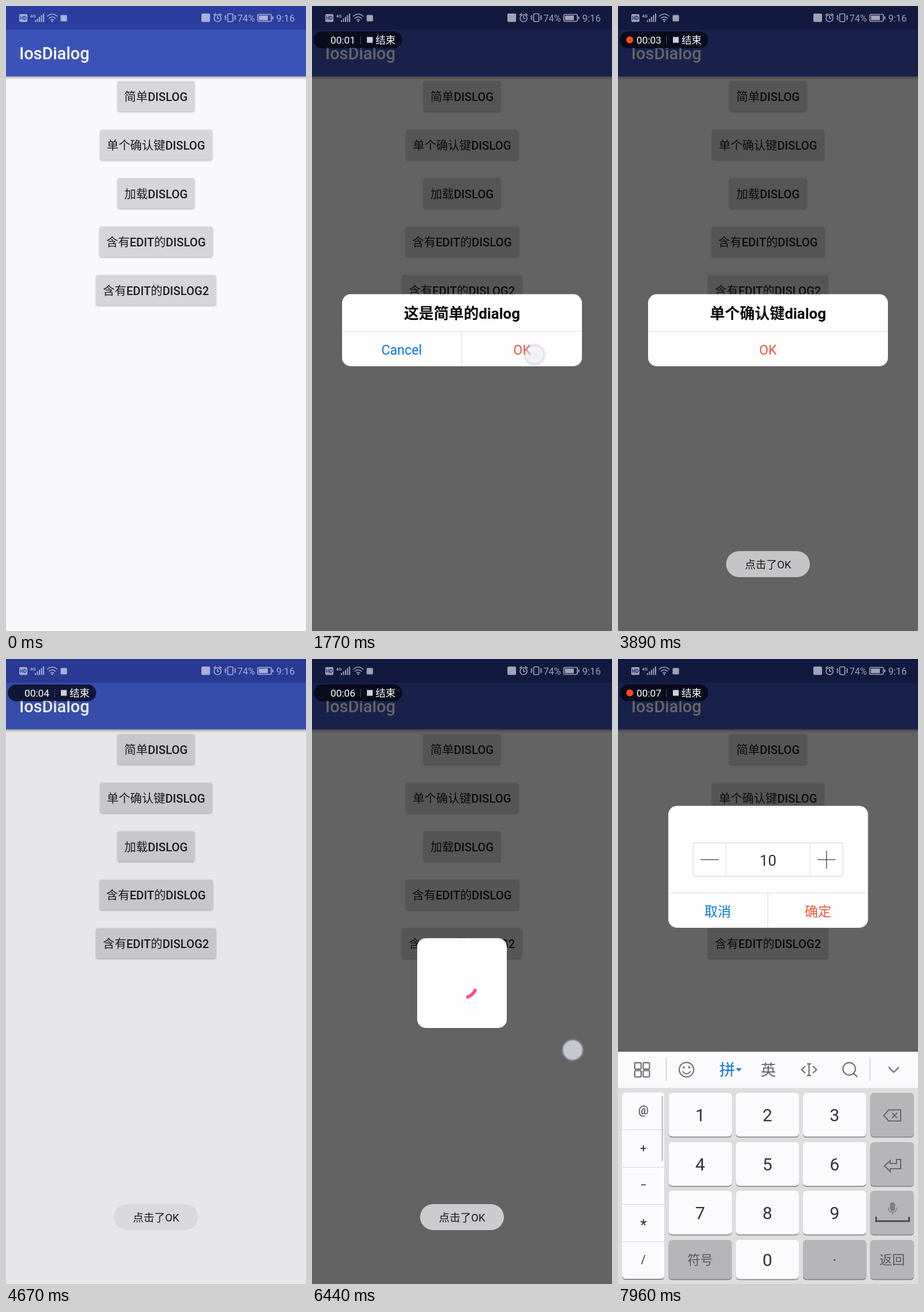
Animation, 519 px wide and 1079 px high, one loop 8000 ms. Source, as an HTML page:

```html
<!DOCTYPE html>
<html lang="zh-CN">
<head>
<meta charset="utf-8">
<style>
html, body { margin: 0; width: 100%; height: 100%; overflow: hidden; background: #f9f8fb }
svg { display: block; width: 100%; height: 100% }
text { font-family: Roboto, 'Noto Sans CJK SC', 'Noto Sans CJK', sans-serif; white-space: pre }
.raised { filter: drop-shadow(0 1.5px 1.5px rgba(0,0,0,.32)) }
.line { fill: none; stroke: #666; stroke-width: 2 }
</style>
</head>
<body>
<svg id="stage" viewBox="0 0 519 1079"></svg>
<script>
const BLUE = '#0a74de', RED = '#e8573b', RULE = '#dcdce6';

const rect = (x, y, x2, y2, r, fill, more = '') =>
  `<rect x="${x}" y="${y}" width="${x2 - x}" height="${y2 - y}" rx="${r}" fill="${fill}" ${more}/>`;
const text = (s, x, y, size, fill, more = 'text-anchor="middle"') =>
  `<text x="${x}" y="${y}" font-size="${size}" fill="${fill}" ${more}>${s}</text>`;
const path = (d, more = 'class="line"') => `<path d="${d}" ${more}/>`;
const rule = d => path(d, `fill="none" stroke="${RULE}" stroke-width="1.2"`);
const group = (id, body, more = '') => `<g id="${id}" ${more}>${body}</g>`;

// App screen
const buttons = [
  ['简单DISLOG', 193, 326], ['单个确认键DISLOG', 163, 356.5], ['加载DISLOG', 193, 326],
  ['含有EDIT的DISLOG', 162, 357.5], ['含有EDIT的DISLOG2', 156, 363]
].map(([label, x, x2], i) => {
  const y = 130 + 83.7 * i;
  return `<g class="raised">${rect(x, y, x2, y + 52, 3, '#d6d5d8')}</g>` +
    rect(x, y, x2, y + 52, 3, '#000', `id="press${i}" opacity="0"`) +
    text(label, 259.5, y + 34.2, 20.2, '#1c1c1e', 'text-anchor="middle" font-weight="500"');
}).join('');

const app = rect(0, 0, 519, 1079, 0, '#f9f8fb') +
  `<g style="filter:drop-shadow(0 2px 2.5px rgba(0,0,0,.35))">${rect(-9, 0, 528, 121.5, 0, '#3b53b8')}</g>` +
  rect(0, 0, 519, 41, 0, '#2b3e9f') +
  text('IosDialog', 23, 92, 28.8, '#fff', 'font-weight="500"') + buttons;

// Dialogs
const alertBox = (title, actions) => rect(52, 497.5, 467, 622, 15, '#fffeff') +
  text(title, 259.5, 540, 25.9, '#0b0b0d', 'text-anchor="middle" font-weight="700"') +
  rule('M52 561.5H467') + actions;

const dialogs = [
  alertBox('这是简单的dialog', rule('M259.2 562V622') +
    text('Cancel', 155, 601.5, 23, BLUE) + text('OK', 363.5, 601.5, 23, RED)),
  alertBox('单个确认键dialog', text('OK', 259.5, 601.5, 23, RED)),
  rect(182, 482, 337, 637, 15, '#fffeff') +
    path('', 'id="arc" fill="none" stroke="#f9527c" stroke-width="5.5"'),
  rect(87, 253.5, 432.5, 464, 15, '#fffeff') +
    rect(130, 317.5, 389, 375, 3, 'none', 'stroke="#d9d9e0" stroke-width="1.3"') +
    rule('M187 318V375M332 318V375M87 404H432.5M259.2 404V464') +
    path('M142.5 346.3H174.5M345 346.3H376.5M360.7 331V362', 'fill="none" stroke="#68686c" stroke-width="1.8"') +
    text('10', 259.5, 356.5, 26, '#333') +
    rect(274, 329, 276.3, 364.5, 0, '#df4d3d', 'id="caret"') +
    text('取消', 172.5, 444, 23, BLUE) + text('确定', 346, 444, 23, RED)
].map((body, i) => group('dialog' + i, body)).join('');

// Keyboard
const LIGHT = '#fbfafc', GRAY = '#b6b6b8';
const cols = [[87.5, 197], [204, 313], [320, 429.5], [436.5, 512]];
const rows = [[749, 825], [834, 910], [918, 994], [1003, 1071]];
const labels = ['1', '2', '3', '', '4', '5', '6', '', '7', '8', '9', '', '符号', '0', '·', '返回'];
const keys = labels.map((s, i) => {
  const [x, x2] = cols[i % 4], [y, y2] = rows[i >> 2];
  const gray = i % 4 == 3 || i == 12 || i == 14;
  const size = s.length > 1 ? 22 : 30;
  return rect(x, y + 1.5, x2, y2 + 1.2, 6, '#87878a') + rect(x, y, x2, y2 - .5, 6, gray ? GRAY : LIGHT) +
    text(s, (x + x2) / 2, (y + y2) / 2 + size * .36, size, gray ? '#58585b' : '#333');
}).join('');
const column = rect(7, 750, 80.5, 1072, 6, '#87878a') + rect(7, 748.5, 80.5, 1070, 6, LIGHT) +
  path('M8 812.5H80M8 877.5H80M8 941.5H80M8 1006H80', 'stroke="#d4d4d8" stroke-width="1.2"') +
  rect(75.5, 754, 78, 867, 1.2, '#c0c0c4') +
  ['@', '+', '−', '*', '/'].map((s, i) => text(s, 44, (s == '*' ? 792 : 786) + 64.5 * i, s == '*' ? 26 : 20, '#333')).join('');
const square = (x, y) => rect(x, y, x + 11, y + 11, 1.5, 'none', 'class="line"');
const tools = square(29, 697) + square(43.5, 697) + square(29, 710.5) + square(43.5, 710.5) +
  path('M83.5 687.5V729M436 687.5V729', 'stroke="#c9c9ce" stroke-width="1.3"') +
  '<circle cx="118.5" cy="709" r="12.5" class="line"/>' +
  path('M111.5 711.5Q118.5 721 125.5 711.5') +
  '<circle cx="114" cy="705" r="1.8" fill="#666"/><circle cx="123" cy="705" r="1.8" fill="#666"/>' +
  text('拼', 189, 719, 27.5, BLUE) + path('M204 706.5H214L209 712Z', `fill="${BLUE}"`) +
  text('英', 260, 718.5, 26.5, '#606064') +
  path('M324 703L317.5 709L324 715M337 703L343.5 709L337 715M327 699H334M327 719H334M330.5 699V719') +
  '<circle cx="400" cy="707.5" r="10.8" class="line"/>' + path('M407.5 715.5L414 721.5') +
  path('M468 704.5L477 713.5L486 704.5');
const keyIcons = path('M460 788L468 778.5H489V797.5H468ZM474 783.5L483 792.5M483 783.5L474 792.5') +
  path('M461 875L471 866V871H482V864H489V880H471V885Z') +
  rect(470.5, 938, 479.5, 953, 4.5, '#7f7f83') +
  path('M467.5 947Q468 955 475 955T482.5 947M475 955V959', 'fill="none" stroke="#7f7f83" stroke-width="1.5"') +
  path('M446.5 963V970.5H503.5V963', 'fill="none" stroke="#505054" stroke-width="3"');
const keyboard = rect(0, 678, 519, 741, 0, LIGHT) + rect(0, 740.5, 519, 1079, 0, '#dededf') +
  tools + column + keys + keyIcons;

// Overlays
const toast = rect(187, 941, 332, 986, 22.5, '#d7d6d9', 'opacity=".9"') +
  text('点击了OK', 259.5, 971, 18.6, '#161616');

const white = 'fill="none" stroke="#fff" stroke-width="1.6"';
const status = rect(23, 14, 37, 27.5, 2, '#fff') +
  text('HD', 30, 24, 8.5, '#26368a', 'text-anchor="middle" font-weight="700"') +
  text('4G', 41.5, 20, 8, '#fff', 'font-weight="700"') +
  [0, 1, 2, 3, 4].map(i => rect(50 + 3.5 * i, 24.5 - 2.9 * i, 52 + 3.5 * i, 27.5, 0, '#fff')).join('') +
  path('M71 18Q80 10 89 18M74 21.5Q80 16 86 21.5M77 24.5Q80 22 83 24.5', white) +
  '<circle cx="80" cy="26.3" r="1.4" fill="#fff"/>' + rect(94.5, 15.5, 105.5, 26.5, 1.5, '#fff') +
  rect(338, 13, 353, 27.5, 2, '#fff') +
  `<circle cx="366" cy="21" r="6" ${white}/>` + path('M366 17V21.5H369M359 16L363 13M369 13L373 16', white) +
  rect(383.5, 13.5, 392.5, 27, 1.5, 'none', white) +
  path('M380.5 16L379 18L380.5 20L379 22L380.5 24M395.5 16L397 18L395.5 20L397 22L395.5 24', white) +
  text('74%', 400.5, 26.8, 16.2, '#fff', '') +
  rect(435.5, 14.5, 459, 26.5, 2, 'none', white) + rect(437.5, 16.5, 453, 24.5, 0, '#fff') +
  rect(460.5, 18, 462.5, 23, 0, '#fff') + text('9:16', 467.5, 26.8, 16.6, '#fff', '');

const pill = rect(3, 44, 156, 73, 14.5, '#02040a', 'opacity=".72"') +
  '<circle id="dot" cx="20.3" cy="58.5" r="6" fill="#ff4a20"/>' +
  text('00:00', 32, 65, 17.3, '#fff', 'id="clock"') + rect(83.5, 52, 84.5, 66, 0, '#4b5368') +
  rect(95, 53.5, 105, 63.5, 0, '#cfd0d6') + text('结束', 110, 65.2, 17.3, '#fff', '');

const finger = '<circle r="19.5" fill="#a9a8c4" opacity=".35"/>' +
  '<circle r="16" fill="#ebeaf0" fill-opacity=".68" stroke="#c0c0dc" stroke-width="2" stroke-opacity=".8"/>';

stage.innerHTML = group('app', app) + rect(0, 0, 519, 1079, 0, '#000', 'id="dim"') + dialogs +
  group('board', keyboard) + group('toast', toast) + group('status', status, 'opacity=".6"') +
  group('pill', pill) + group('finger', finger);

// Timing
const $ = id => document.getElementById(id);
const ramp = (t, a, b) => Math.min(1, Math.max(0, (t - a) / (b - a)));
const smooth = x => x * x * (3 - 2 * x);
const pulse = (t, on, off, rise, fall) => ramp(t, on, on + rise) * (1 - ramp(t, off, off + fall));
const show = (id, opacity) => {
  $(id).setAttribute('opacity', opacity);
  $(id).setAttribute('visibility', opacity > 0 ? 'visible' : 'hidden');
};

const spans = [[910, 1960], [2850, 4400], [5290, 6530], [7390, 9000]];  // dialog open, close
const taps = [  // x, y, down, up, pressed button
  [290, 158, 640, 790, 0], [385, 602, 1725, 1880], [299, 238, 2600, 2790, 1], [290, 600, 4240, 4350],
  [292, 326, 5060, 5230, 2], [451, 675, 6350, 6480], [297, 410, 7170, 7370, 3]
];

function spinner(t) {
  const q = (t - 6440) / 1333 + .8925, n = Math.floor(q), p = q - n;
  const head = smooth(ramp(p, 0, .5)), tail = smooth(ramp(p, .5, 1));
  const from = 24 + .108 * (t - 6440) + 270 * (n + tail - .885);
  const sweep = 18 + 270 * (head - tail);
  const at = deg => {
    const a = deg * Math.PI / 180;
    return `${259.5 + 26 * Math.cos(a)} ${559.5 + 26 * Math.sin(a)}`;
  };
  return `M${at(from)}A26 26 0 ${+(sweep > 180)} 1 ${at(from + sweep)}`;
}

function draw(t) {
  let dim = 0;
  spans.forEach(([a, b], i) => {
    show('dialog' + i, pulse(t, a, b, 170, 190));
    dim = Math.max(dim, pulse(t, a + 50, b + 60, 200, 240));
  });
  show('dim', .6 * dim);
  $('arc').setAttribute('d', spinner(t));

  const up = smooth(ramp(t, 7680, 7920));
  $('board').setAttribute('transform', `translate(0 ${401 * (1 - up)})`);
  $('dialog3').setAttribute('transform', `translate(0 ${201 * (1 - up)})`);
  show('board', up > 0 ? 1 : 0);
  show('caret', t < 7930 ? 1 : 0);

  show('toast', Math.max(pulse(t, 2080, 3880, 200, 180), pulse(t, 4430, 6560, 200, 200)));

  let touch = 0;
  for (const [x, y, down, lift, button] of taps) {
    const o = pulse(t, down, lift, 80, 80);
    if (o > touch) {
      touch = o;
      $('finger').setAttribute('transform', `translate(${x} ${y})`);
    }
    if (button >= 0) show('press' + button, .1 * pulse(t, down + 170, down + 330, 60, 200));
  }
  show('finger', touch);

  const ticks = (t - 435) / 995, seconds = Math.max(0, Math.floor(ticks));
  show('pill', ramp(t, 90, 250));
  $('clock').textContent = '00:0' + seconds;
  show('dot', ticks < 0 || (ticks - seconds) * 995 > 343 ? 1 : 0);
}

(function frame() {
  draw(performance.now() % 8000);
  requestAnimationFrame(frame);
})();
</script>
</body>
</html>
```
